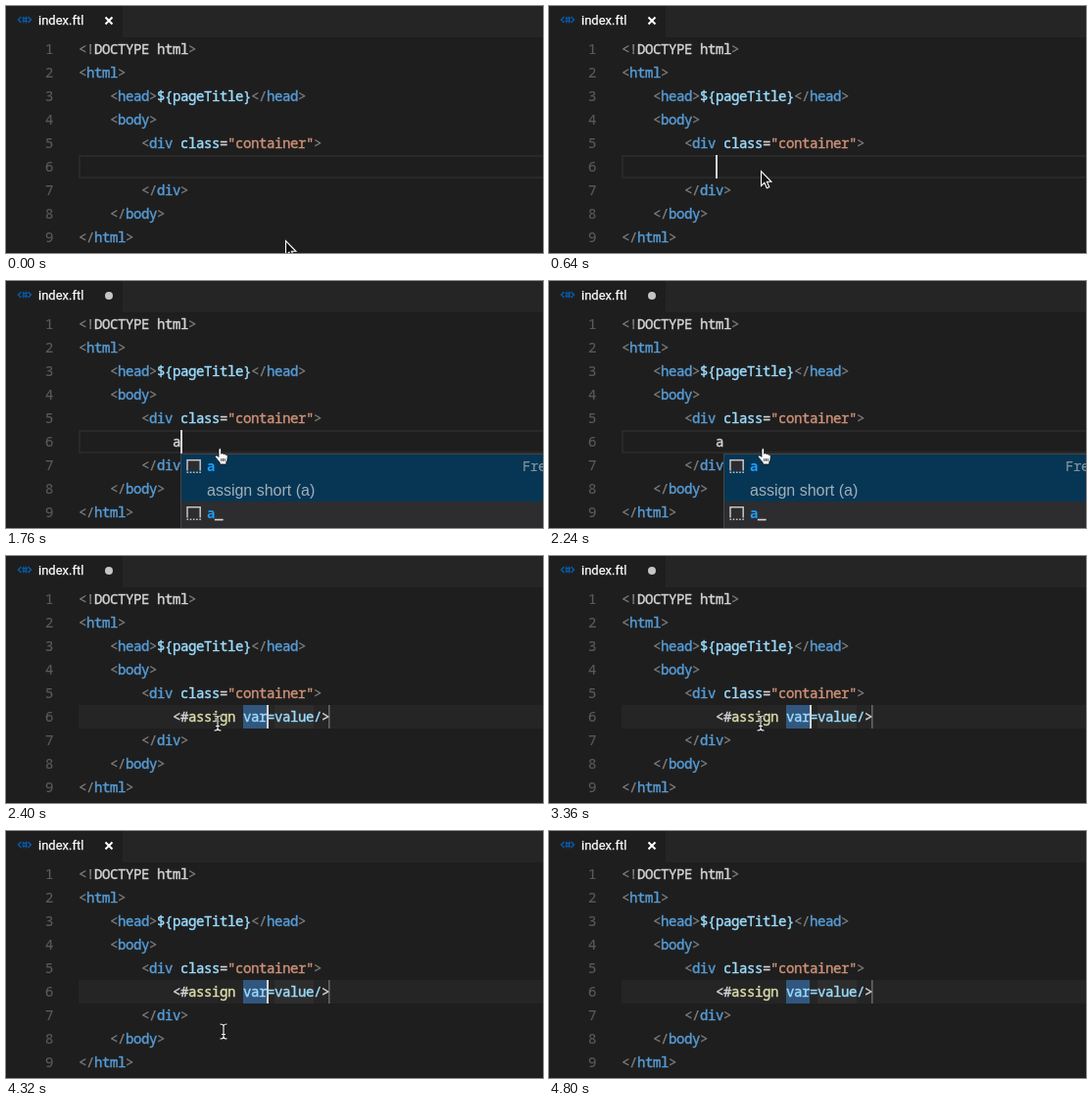
An HTML page for the animation above (5280 ms loop, 548 by 252 pixels).

```html
<!DOCTYPE html>
<html lang="en">
<head>
<meta charset="utf-8">
<title>Snippet completion</title>
<style>
  html, body { margin: 0; width: 100%; height: 100%; overflow: hidden; background: #1e1e1e; }
  svg { display: block; }
  text { white-space: pre; }
  .code { font: 14px "Noto Sans Mono", monospace; letter-spacing: -.4px; }
  .code tspan { fill: currentColor; stroke: currentColor; stroke-width: .4px; }
  .tab { font: 13px Roboto, sans-serif; fill: #fff; }
  .detail { font: 16px "Liberation Sans", sans-serif; fill: #a3afb8; }
  .code .punct { color: #808080; stroke-width: .25px; }
  .tag { color: #569cd6; }
  .attr { color: #9cdcfe; }
  .str { color: #ce9178; }
  .plain { color: #d4d4d4; }
  .fn { color: #dcdcaa; }
  .code .num { color: #5a5a5a; stroke-width: .2px; }
  .code .match { color: #1a9fff; font-weight: bold; stroke: none; }
  .code .hint { color: #8093a1; stroke-width: .2px; }
</style>
</head>
<body>
<svg width="548" height="252" viewBox="0 0 548 252">
  <rect width="548" height="252" fill="#1e1e1e"/>
  <rect x="119" width="429" height="32" fill="#252526"/>

  <g fill="none" stroke="#0a59a8" stroke-width="1.5">
    <path d="M15.5 11L12.5 14L15.5 17M22.5 11L25.5 14L22.5 17"/>
    <path d="M18 10.5V17.5M20.5 10.5V17.5M16.5 12.6H22M16.5 15.4H22" stroke-width="1.1"/>
  </g>
  <text class="tab" x="33" y="19" stroke="#fff" stroke-width=".25">index.ftl</text>
  <path id="close" d="M101.5 11.5L108.5 18.5M108.5 11.5L101.5 18.5" stroke="#fff" stroke-width="2"/>
  <circle id="dirty" cx="105" cy="15" r="4" fill="#c5c5c5"/>

  <path id="line" d="M550 153H75V175H550" fill="none" stroke="#292929" stroke-width="2"/>
  <g id="marks">
    <rect x="74" y="152" width="474" height="24" fill="#252525"/>
    <rect x="242" y="152" width="24" height="24" fill="#31577f"/>
    <rect x="274" y="152" width="40" height="24" fill="#2d2d2d"/>
    <rect x="329" y="152" width="1.5" height="24" fill="#686868"/>
  </g>
  <g id="code" class="code"></g>
  <rect id="caret" y="152" width="2" height="24" fill="#d4d4d4"/>

  <g id="popup">
    <rect x="178" y="176" width="380" height="90" fill="#2d2d30"/>
    <rect x="179" y="177" width="380" height="48" fill="#073655"/>
    <path d="M178.5 260V176.5H560" fill="none" stroke="#454545"/>
    <g stroke="#c5c5c5" stroke-width="1.5">
      <path d="M185 193.5V182.8H198.2V193.5M185 241.5V230.8H198.2V241.5" fill="#2d2d30"/>
      <path d="M184.5 195.2H199M184.5 243.2H199" stroke-dasharray="1.6 1.6"/>
    </g>
    <g id="items" class="code"></g>
    <text class="detail" x="205" y="219">assign short (a)</text>
  </g>

  <g id="arrow">
    <path d="M.5 .7V15.5L3.9 12.3L6.3 17.8L8.8 16.7L6.4 11.3H10.9Z" fill="#111" stroke="#fff" stroke-width="1.1"/>
  </g>
  <g id="hand">
    <path d="M4 9.5V2C4 .2 6.6 .2 6.6 2V6.3C7.2 5.2 9 5.5 9.1 6.8C9.8 5.9 11.2 6.3 11.3 7.5C12.2 7 13.2 7.6 13.2 8.7C13.2 12 12.6 13.3 11.8 14.6V17H5.2V15.2C3.8 13.6 2.4 11.8 .6 9.7C-.2 8.3 1.8 7.3 2.8 8.3Z" fill="#fff" stroke="#111" stroke-width=".8"/>
    <path d="M6.7 11V14M8.5 11V14M10.3 11V14" stroke="#111" stroke-width=".8"/>
  </g>
  <g id="beam" fill="none">
    <path id="beamShape" d="M-3.5 -7.5C-1.5 -7.5 0 -7 0 -5.5C0 -7 1.5 -7.5 3.5 -7.5M0 -5.5V5.5M-3.5 7.5C-1.5 7.5 0 7 0 5.5C0 7 1.5 7.5 3.5 7.5M-2 3H2"/>
    <use href="#beamShape" stroke="#111" stroke-width="2.6"/>
    <use href="#beamShape" stroke="#f0f0f0" stroke-width="1.2"/>
  </g>
</svg>
<script>
const NS = "http://www.w3.org/2000/svg";
const $ = id => document.getElementById(id);
const LOOP = 5280;

function write(parent, x, y, tokens) {
  const text = document.createElementNS(NS, "text");
  text.setAttribute("x", x);
  text.setAttribute("y", y);
  for (const [cls, str] of tokens) {
    const span = document.createElementNS(NS, "tspan");
    span.setAttribute("class", cls);
    span.textContent = str;
    text.append(span);
  }
  parent.append(text);
  return text;
}

const open = name => [["punct", "<"], ["tag", name], ["punct", ">"]];
const shut = name => [["punct", "</"], ["tag", name], ["punct", ">"]];

// Each entry: indent in columns, then tokens
const lines = [
  [0, [["punct", "<!"], ["plain", "DOCTYPE html"], ["punct", ">"]]],
  [0, open("html")],
  [4, [...open("head"), ["attr", "${pageTitle}"], ...shut("head")]],
  [4, open("body")],
  [8, [["punct", "<"], ["tag", "div"], ["attr", " class"], ["plain", "="],
       ["str", '"container"'], ["punct", ">"]]],
  [0, []],
  [8, shut("div")],
  [4, shut("body")],
  [0, shut("html")]
];
lines.forEach(([indent, tokens], i) => {
  const y = 49 + 24 * i;
  write($("code"), 40, y, [["num", String(i + 1)]]);
  write($("code"), 74 + 8 * indent, y, tokens);
});

const typed = write($("code"), 170, 169, [["plain", "a"]]);
const snippet = write($("code"), 170, 169, [
  ["plain", "<#"], ["fn", "assign"], ["attr", " var=value/"], ["plain", ">"]
]);

write($("items"), 205, 194, [["match", "a"]]);
write($("items"), 205, 242, [["match", "a"], ["plain", "_"]]);
write($("items"), 527, 194, [["hint", "FreeMarker"]]);

// Each track: [start time, value], held until the next step
const tracks = {
  stage: [[0, "empty"], [1760, "typed"], [2400, "snippet"]],
  dirty: [[0, false], [1760, true], [3840, false]],
  caret: [[0, null], [640, 170], [1120, null], [1600, 170], [1760, 178],
          [2240, null], [2400, 266], [2880, null], [3360, 266], [3840, null],
          [4320, 266], [4800, null]],
  mouse: [[0, ["arrow", 285, 239]], [160, ["arrow", 224, 173]],
          [320, ["arrow", 216, 170]], [480, ["arrow", 216, 168]],
          [1760, ["hand", 213, 170]], [2400, ["beam", 216, 170.5]],
          [4160, ["beam", 217, 173]], [4320, ["beam", 222, 204.5]],
          [4480, ["beam", 227, 241.5]], [4640, ["none", 0, 0]]]
};

const at = (track, t) => track.findLast(([start]) => start <= t)[1];
const show = (el, on) => { el.style.display = on ? "" : "none"; };

function draw(t) {
  const stage = at(tracks.stage, t);
  const dirty = at(tracks.dirty, t);
  const caret = at(tracks.caret, t);
  const [kind, x, y] = at(tracks.mouse, t);

  show(typed, stage === "typed");
  show($("popup"), stage === "typed");
  show(snippet, stage === "snippet");
  show($("marks"), stage === "snippet");
  show($("line"), stage !== "snippet");
  show($("dirty"), dirty);
  show($("close"), !dirty);

  show($("caret"), caret !== null);
  if (caret !== null) $("caret").setAttribute("x", caret);

  for (const id of ["arrow", "hand", "beam"]) {
    show($(id), id === kind);
    $(id).setAttribute("transform", `translate(${x} ${y})`);
  }
}

const begin = performance.now();
function tick() {
  draw((performance.now() - begin) % LOOP);
  requestAnimationFrame(tick);
}
tick();
</script>
</body>
</html>
```
